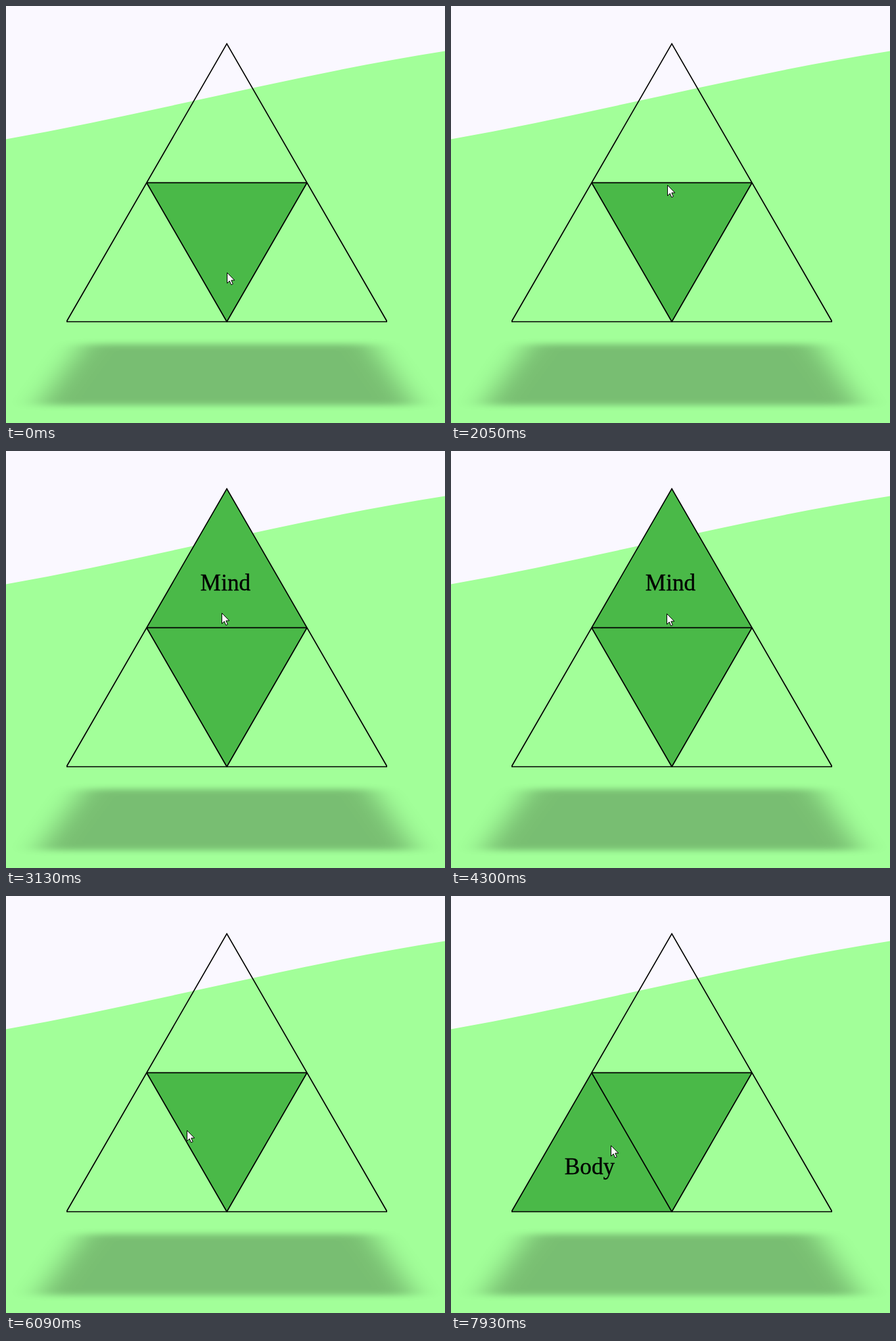
An HTML page that plays this animation: 668 by 634 pixels, repeating every 8000 ms.

```html
<!DOCTYPE html>
<html lang="en">
<head>
<meta charset="utf-8">
<title>Triangle hover</title>
<style>
  html, body { margin: 0; width: 100%; height: 100%; overflow: hidden; background: #faf8ff; }
  svg { display: block; width: 100vw; height: 100vh; }
  text { font: 35.2px "Liberation Serif", serif; text-anchor: middle; stroke: #000; stroke-width: .3; }
  .fill { fill: #4ab948; }
  .lines { fill: none; stroke: #000; stroke-width: 1.7; }
</style>
</head>
<body>
<svg viewBox="0 0 668 634">
  <defs>
    <filter id="blur" x="-20%" y="-30%" width="140%" height="160%">
      <feGaussianBlur stdDeviation="23 5"/>
    </filter>
    <clipPath id="box"><rect x="92" y="55" width="488" height="427"/></clipPath>
    <path id="tri" d="M0 0L122 211.3H-122Z"/>
  </defs>
  <rect width="668" height="634" fill="#faf8ff"/>
  <path d="M0 202.5C223 163 445 103 668 68.5V634H0Z" fill="#a2ff99"/>
  <path d="M118 514H556L622 607H50Z" opacity=".25" filter="url(#blur)"/>
  <use class="fill" href="#tri" transform="translate(336 480) scale(1 -1)"/>
  <use class="fill" id="mindFill" href="#tri" x="336" y="57.4"/>
  <use class="fill" id="bodyFill" href="#tri" x="214" y="268.7"/>
  <g class="lines" clip-path="url(#box)">
    <path d="M336 57.4L580 480H92Z"/>
    <path d="M214 268.7H458L336 480Z" stroke-linejoin="bevel"/>
  </g>
  <text id="mindText" x="334" y="212">Mind</text>
  <text id="bodyText" x="211" y="423">Body</text>
  <path id="cursor" d="M.5 .5V16.5L4.2 13L6.7 18.8L9.3 17.7L6.8 12H11.8Z" fill="#fff" stroke="#000"/>
</svg>
<script>
const LOOP = 8000, STEP = 77.2, FIRST = 428;
const $ = id => document.getElementById(id);
const clamp = v => Math.min(1, Math.max(0, v));
const smooth = v => v * v * (3 - 2 * v);

// pointer moves: start and end time, then where the tip comes to rest
const home = [336, 405];
const moves = [
  [60, 110, 334, 377],
  [360, 885, 331, 324],
  [1570, 2355, 328, 246],
  [4235, 5020, 328, 331],
  [5740, 6063, 275, 356],
  [6063, 6540, 241, 383],
  [7780, 7910, 243, 379]
];

// CSS "ease": cubic-bezier(.25, .1, .25, 1)
function ease(x) {
  const bez = (s, a, b) => 3 * s * (1 - s) ** 2 * a + 3 * s * s * (1 - s) * b + s ** 3;
  let lo = 0, hi = 1;
  for (let i = 0; i < 24; i++) {
    const mid = (lo + hi) / 2;
    if (bez(mid, .25, .25) < x) lo = mid; else hi = mid;
  }
  return bez(lo, .1, 1);
}

const fade = (t, start, length) => ease(clamp((t - start) / length));

function pointer(t) {
  let [x, y] = home;
  for (const [start, end, toX, toY] of moves) {
    const k = smooth(clamp((t - start) / (end - start)));
    x += (toX - x) * k;
    y += (toY - y) * k;
  }
  return [Math.round(x), Math.round(y)];
}

function draw(now) {
  let t = now % LOOP;
  if (t >= FIRST) t = FIRST + Math.floor((t - FIRST) / STEP) * STEP;
  $("mindFill").style.opacity = fade(t, 2150, 500) - fade(t, 4520, 500);
  $("mindText").style.opacity = fade(t, 2160, 1000) - fade(t, 4390, 1000);
  $("bodyFill").style.opacity = fade(t, 6220, 500);
  $("bodyText").style.opacity = fade(t, 6220, 1000);
  $("cursor").setAttribute("transform", `translate(${pointer(t)})`);
}

let begin;
function tick(now) {
  begin ??= now;
  draw(now - begin);
  requestAnimationFrame(tick);
}
draw(0);
requestAnimationFrame(tick);
</script>
</body>
</html>
```
